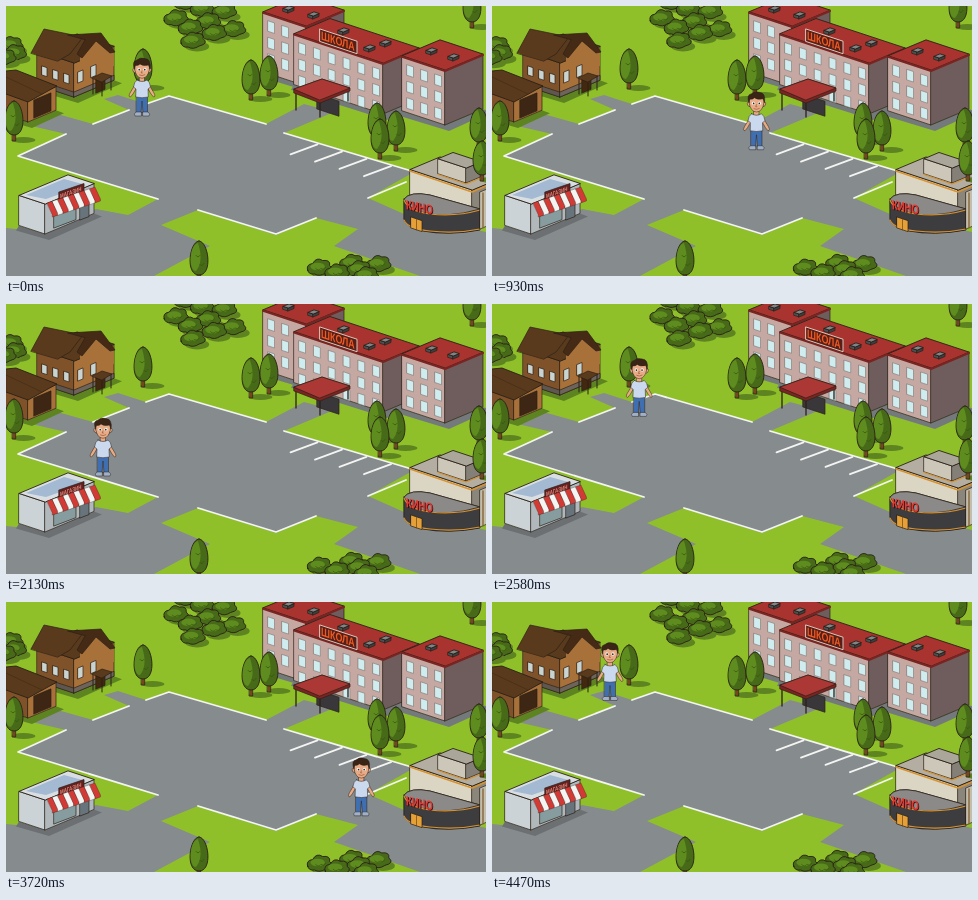
Write an HTML page that moves like this. It is 480x270 px and loops after 4530 ms.

```html
<!DOCTYPE html>
<html lang="ru">
<head>
<meta charset="utf-8">
<title>Городок</title>
<style>
html, body { margin: 0; width: 100%; height: 100%; overflow: hidden; background: #8fc02a; }
svg { display: block; width: 100vw; height: 100vh; }
text { font-family: "Liberation Sans", Arial, sans-serif; font-weight: 700; }
</style>
</head>
<body>
<svg id="stage" viewBox="0 0 480 270" preserveAspectRatio="none"></svg>
<script>
const INK = '#2b2118', GRASS = '#8fc02a', ROAD = '#868b8e', SHADE = '#5d8420', WHITE = '#f4f5f3';
// Rise per pixel of walls that run to the left and to the right.
const KL = .33, KR = .42;

const art = [];
const add = s => art.push(s);
const path = (d, fill, stroke = INK, w = .7) =>
  `<path d="${d}" fill="${fill}" stroke="${stroke}" stroke-width="${w}" stroke-linejoin="round" stroke-linecap="round"/>`;
const dot = (x, y, rx, ry, fill) => `<ellipse cx="${x}" cy="${y}" rx="${rx}" ry="${ry}" fill="${fill}"/>`;
const poly = (pts, fill, stroke, w) => add(path(`M${pts}Z`, fill, stroke, w));
const flat = (pts, fill) => poly(pts, fill, 'none');
const line = (d, color = INK, w = .7) => add(path(`M${d}`, 'none', color, w));
const label = (s, x, y, size, color, sx, k, sy) =>
  add(`<text font-size="${size}" fill="${color}" transform="matrix(${sx},${sx * k},0,${sy},${x},${y})">${s}</text>`);

// Upright panel on a wall with slope k; x, y is its top left corner.
const panel = (x, y, w, h, k, fill, stroke, sw) =>
  poly(`${x},${y} l${w},${w * k} v${h} l${-w},${-w * k}`, fill, stroke, sw);

// Block whose near upper corner is x, y; l and r are the wall lengths, h the height.
function block(x, y, l, r, h, [left, right, top], apron) {
  const b = y + h;
  if (apron) flat(`${x - l},${b - l * KL} ${x},${b} ${x + r},${b - r * KR} l8,3 L${x + 4},${b + 6} L${x - l - 3},${b - l * KL + 5}`, apron);
  panel(x - l, y - l * KL, l, h, KL, left);
  panel(x, y, r, h, -KR, right);
  poly(`${x},${y} l${-l},${-l * KL} l${r},${-r * KR} l${l},${l * KL}`, top, INK, .9);
}
function panes(x, y, cols, rows, dx, dy) {
  for (let r = 0; r < rows; r++)
    for (let c = 0; c < cols; c++)
      panel(x + c * dx, y + r * dy + c * dx * KL, 6.5, 10.5, KL, '#cfecee', '#7d7674', .6);
}

function tree(x, top) {
  const r = 9.5, h = 34, b = top + h, m = top + h * .6;
  add(dot(x + r, b + 5, 12, 3, SHADE));
  panel(x - 1.5, b - 3, 3.2, 9, 0, '#74471f');
  poly(`${x},${top} C${x + r},${top} ${x + r * 1.5},${b} ${x},${b} C${x - r * 1.5},${b} ${x - r},${top} ${x},${top}`, '#466a18', INK, .9);
  flat(`${x - 1},${top + 2} C${x - r},${top + 3} ${x - r * 1.2},${b - 4} ${x - 3},${b - 4} Q${x + 5},${m} ${x - 1},${top + 2}`, '#5f8c1e');
  line(`${x - 3},${m - 6} q2,3 4,0 M${x + 1},${m + 3} q2,3 4,-1`, '#38570f');
}
function bush(x, y) {
  const r = 12, h = 7.5;
  add(dot(x + 4, y + 6, r, 5, SHADE));
  poly(`${x - r},${y + 3} q-2,-6 5,-7 q4,-7 10,-3 q8,-1 7,5 q6,5 -4,${h} q-6,4 -11,1 q-6,1 -7,-4`, '#466a18', INK, .9);
  add(dot(x - 2, y - 1, r * .6, 3.8, '#5f8c1e'));
  line(`${x - 4},${y + 1} q3,3 5,0 q3,2 5,-1`, '#38570f');
}
// Bushes spread evenly over an oval, the far ones first.
function grove(x, y, rx, ry, n) {
  const spots = Array.from({ length: n }, (_, i) => {
    const d = Math.sqrt((i + .4) / n), a = i * 2.4;
    return [x + rx * d * Math.cos(a), y + ry * d * Math.sin(a)];
  });
  spots.sort((p, q) => p[1] - q[1]).forEach(p => bush(...p));
}
function vent(x, y) {
  block(x, y, 5, 6, 3, ['#4b4f52', '#3c3f42', '#7f8486']);
}

function ground() {
  flat('0,0 H480 V270 H0', GRASS);
  flat('12,150 60,128 17,118 48,107 87,118 123,104 98,93 112,89 140,98 163,90 260,118 298,98 328,106 278,127 408,166 362,192 398,208 480,226 480,270 414,270 328,240 352,223 310,212 270,229 192,204 155,219 204,240 148,270 0,270 0,222 42,226 90,203 122,209 152,193', ROAD);
  line('87,118 L123,104 M140,98 L163,90 L260,118 M60,128 L12,150 L152,193', WHITE, 1.8);
  line('192,204 L270,228 L310,212 M278,127 L409,166 M362,192 L400,176', WHITE, 1.8);
  for (let i = 0; i < 4; i++) line(`${284.5 + i * 24.5},${148.3 + i * 7.3} l27,-10`, WHITE, 1.8);
}

function house() {
  const wall = '#a9713a', dark = '#80522a', roof = '#5a3a1c', ridge = '#452b15';
  block(68, 57, 37, 40, 34, [dark, wall, roof], SHADE);
  poly('74,52 88,33 108,44 108,60 74,70', wall, 'none');
  panel(31, 74, 37, 5, KL, '#5f574f');
  panel(68, 86, 40, 5, -KR, '#6d645b');
  poly('25,47 38,23 77,31 64,48 52,55', roof);
  poly('62,29 95,27 109,46 104,47 90,35 76,52 71,48 79,34', ridge);
  for (const x of [36, 47, 58]) panel(x, 60 + (x - 36) * KL, 5, 9, KL, '#c9d3cf');
  for (const x of [72, 85]) panel(x, 66 - (x - 72) * KR, 5, 11, -KR, '#c9d3cf');
  panel(90, 73, 9, 14, -KR, '#41280f');
  poly('86,72 96,67 106,70 96,76', roof);
  line('87,73 v15 M96,77 v13 M105,71 v13', INK, 1);
  block(22, 92, 24, 28, 24, [dark, wall, roof], SHADE);
  panel(28, 94, 17, 18, -KR, '#3d2613');
  poly('0,65 10,64 51,80 22,96 0,88', roof, INK, .9);
  line('0,71 L36,88', ridge);
}

function school() {
  const paint = ['#c6a8a2', '#6e5d5c', '#a8332f'];
  // Each wing: near corner, wall lengths, height, window columns and spacing.
  const wing = (x, y, l, r, h, cols, dx) => {
    block(x, y, l, r, h, paint, '#747a7c');
    line(`${x - l},${y - l * KL + 1} L${x},${y + 1} l${r},${-r * KR}`, '#7b2422', 2);
    panes(x - l + 5, y - l * KL + 9, cols, 3, dx, 16.5);
  };
  wing(300, 20, 43, 38, 60, 2, 14);
  wing(377, 57, 89, 36, 51, 6, 14.8);
  wing(439, 64, 43, 38, 55, 3, 14);
  [[282, 4], [307, 10], [337, 26], [363, 43], [379, 38], [425, 46], [447, 52]].forEach(v => vent(...v));
  panel(314, 23, 37, 12.5, KL, '#571f18', '#e6d8cc', .9);
  label('ШКОЛА', 315, 33.6, 9.6, '#ef5a22', .93, KL, 1.25);
  panel(311, 88, 22, 15, KL, '#39373a');
  line('290,86 V104 M314,97 V111 M342,86 V95', INK, 1.3);
  poly('288,83 l28,-10 l28,9 v3 l-30,12 l-26,-10', '#7b2422');
  poly('288,83 l28,-10 l28,9 l-30,12', '#ab3834');
}

function shop() {
  block(39, 198, 26, 49, 30, ['#ccd3d6', '#b0b8bc', '#d8dee1'], '#6c7073');
  poly('20,189 58,173 80,179 40,193', '#a4bad2', 'none');
  panel(48, 210, 22, 12, -.38, '#869c9e');
  panel(74, 200, 9, 14, -.38, '#68747b');
  panel(53, 186, 25, 8, -.34, '#64201f');
  label('МАГАЗИН', 54, 192.4, 4.9, '#e08a7c', .9, -.35, 1.3);
  const n = 9;
  for (let i = 0; i < n; i++) {
    const x = 41 + 48 * i / n, y = 197 - 16 * i / n;
    poly(`${x},${y} l5.3,-1.8 l5.5,12 v2 l-5.5,1.9 v-2`, i % 2 ? WHITE : '#d23a35', INK, .3);
  }
}

function cinema() {
  const stone = ['#dbd6c4', '#8b867b', '#b3aea1'], trim = '#d8922f';
  block(466, 184, 62, 30, 36, stone);
  line('404,165 L466,186 l14,-6', trim, 1.5);
  block(460, 162, 28, 15, 15, ['#ccc7b8', '#858077', '#aaa69a']);
  line('432,168.500 L460,178 l15,-6', trim, 1.2);
  poly('398,193 Q404,185 424,189 L474,203 V224 Q442,230 417,225 Q400,221 398,214', '#3d3c3f', INK, .9);
  poly('398,193 Q404,185 424,189 L474,203 Q440,213 415,206 Q401,201 398,193', '#8b8a88');
  line('398,194 Q402,205 424,208 Q450,211 474,204 M398,214 Q402,223 424,225 Q450,228 474,223', trim, 1.1);
  panel(405, 211, 11, 11, KL, '#e5a038');
  line('410.5,213 v11', '#6e471b');
  panel(474, 186, 7, 37, -KR, '#c3bdab');
  line('477,187 V222', '#87663a', 1.4);
  for (const [d, color] of [[.9, '#41100f'], [0, '#e23a32']])
    label('КИНО', 400 + d, 203 + d, 12, color, .79, .2, 1.1);
}

function boy() {
  const skin = '#e8ab85';
  const part = (d, fill) => path(d, fill, INK, .5);
  const pair = f => f(-1) + f(1);
  return part('M-5.5,37 H5.5 L5.5,55 H1 L0,43 L-1,55 H-5.5Z', '#3f6fb0')
    + pair(s => part(`M${s},54 H${s * 6} Q${s * 9},56 ${s * 7},58 H${s}Z`, '#9fb0c8'))
    + pair(s => part(`M${s * 6},25 Q${s * 9},30 ${s * 12},35 Q${s * 14},39 ${s * 11.5},39 L${s * 9},36 L${s * 5},29Z`, skin))
    + part('M-2.5,18 H2.5 V24 H-2.5Z', skin)
    + part('M-5,22 Q0,25 5,22 Q8,24 8.5,29 L6,31 L6.3,39 Q0,40.500 -6.3,39 L-6,31 L-8.500,29 Q-8,24 -5,22Z', '#cbd9ef')
    + pair(s => part(`M${s * 7.5},10 q${s * 3},0 ${s},4 l${-s * 2},1Z`, skin))
    + part('M-7.5,8 Q-7.5,3 0,3 Q7.5,3 7.5,9 Q7.5,16 3,19.500 Q0,21 -3,19.500 Q-7.5,16 -7.5,8Z', skin)
    + part('M-7.5,11 Q-10.500,3 -5,2 Q-2,-1 3,.6 Q9.500,1 8,11 L6.5,7 Q1,8.500 -2,6 Q-4,8 -6.5,7.5Z', '#3a2416')
    + pair(s => dot(s * 3, 11.5, 1.6, 1.7, WHITE) + dot(s * 2.8, 11.7, .8, .9, INK))
    + path('M0,13 l-.8,2 h1.2 M-2.5,17 Q0,18.500 2.8,16.8', 'none', '#8d4a32', .6);
}

ground();
house();
school();
shop();
cinema();
grove(195, 15, 36, 24, 9);
grove(4, 47, 12, 9, 3);
[[466, -18], [137, 43], [245, 54], [263, 50], [371, 97], [8, 95], [473, 102],
 [390, 105], [374, 113], [476, 135], [193, 235]].forEach(p => tree(...p));
grove(344, 263, 36, 10, 6);

const stage = document.getElementById('stage');
stage.innerHTML = art.join('') + `<g id="boy">${boy()}</g>`;
const walker = document.getElementById('boy');

// Stops and bends of the walk: time, middle of the body, top of the hair.
const WALK = [
  [0, 136, 52], [540, 231, 68.5], [905, 265, 84], [1410, 160, 145], [1800, 90, 177.5],
  [2130, 97, 114], [2455, 122, 48], [3385, 401, 178], [4470, 118, 40.5]
];
const LOOP = 4530, STEP = 30, LAST = 4470;

const slope = (i, k) => (WALK[i + 1][k] - WALK[i][k]) / (WALK[i + 1][0] - WALK[i][0]);

// Speed at a point; zero where the walk turns back.
function speed(i, k) {
  if (i === 0) return slope(0, k);
  if (i === WALK.length - 1) return slope(i - 1, k);
  const a = slope(i - 1, k), b = slope(i, k);
  return a * b > 0 ? 2 * a * b / (a + b) : 0;
}
function at(t, k) {
  let i = 0;
  while (i < WALK.length - 2 && t >= WALK[i + 1][0]) i++;
  const p = WALK[i], q = WALK[i + 1], d = q[0] - p[0], u = (t - p[0]) / d, v = 1 - u;
  return v * v * (1 + 2 * u) * p[k] + u * v * v * d * speed(i, k)
    + u * u * (3 - 2 * u) * q[k] - u * u * v * d * speed(i + 1, k);
}

function draw(ms) {
  const t = Math.min(LAST, Math.floor(ms % LOOP / STEP) * STEP);
  walker.setAttribute('transform', `translate(${at(t, 1).toFixed(2)} ${at(t, 2).toFixed(2)})`);
}

let start;
function tick(now) {
  start ??= now;
  draw(now - start);
  requestAnimationFrame(tick);
}
draw(0);
requestAnimationFrame(tick);
</script>
</body>
</html>
```
